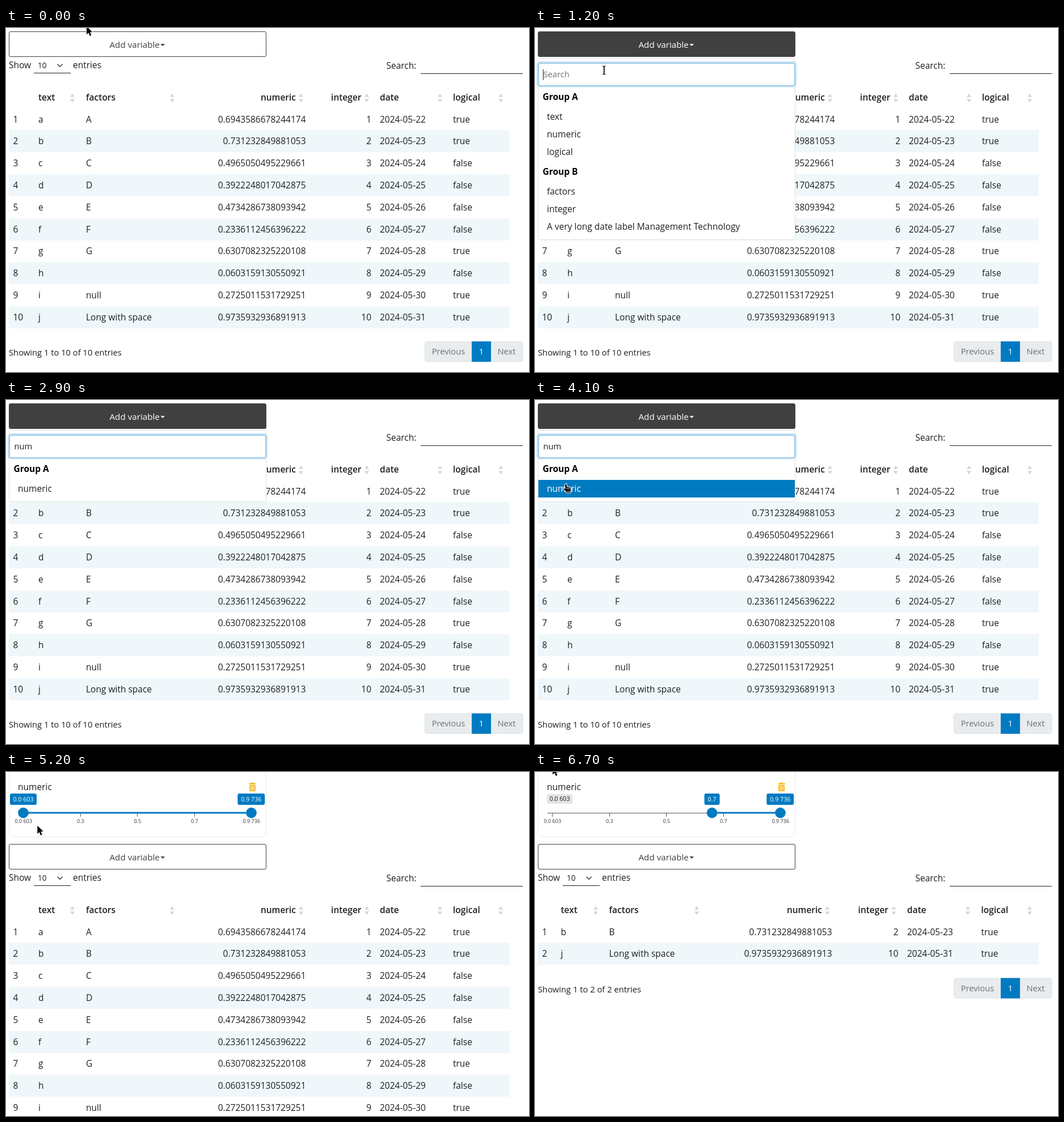
Write an HTML page with a canvas that moves like this. It is 922 px wide and 607 px high and loops after 7300 ms.

```html
<!DOCTYPE html>
<html lang="en">
<head>
<meta charset="utf-8">
<title>Variable filter</title>
<style>
html, body { margin: 0; width: 100%; height: 100%; overflow: hidden; background: #fff; }
canvas { display: block; }
</style>
</head>
<body>
<canvas id="stage" width="922" height="607"></canvas>
<script>
const ctx = document.getElementById('stage').getContext('2d');
const LOOP = 7300, STEP = 100;
const INK = '#1d1f21', BLUE = '#007bc2', DARK = '#404040';
const FONT = '"Open Sans", "Noto Sans", sans-serif';

// Times of the hard changes
const AT = { hover: 300, wallOn: 500, open: 700, wallOff: 1000, n: 2100, u: 2300, m: 2700,
  filter: 2900, pick: 4100, added: 4200, leave: 5100, grab: 5500, release: 6200, rows: 6400 };

const NUMBERS = ['0.6943586678244174', '0.731232849881053', '0.4965050495229661',
  '0.3922248017042875', '0.4734286738093942', '0.2336112456396222', '0.6307082325220108',
  '0.0603159130550921', '0.2725011531729251', '0.9735932936891913'];
const FACTORS = [...'ABCDEFG', '', 'null', 'Long with space'];
const TRUTHS = [0, 1, 6, 8, 9];
const ROWS = NUMBERS.map((num, i) =>
  ['abcdefghij'[i], FACTORS[i], num, String(i + 1), '2024-05-' + (22 + i), String(TRUTHS.includes(i))]);

const NAMES = ['text', 'factors', 'numeric', 'integer', 'date', 'logical'];
const WIDE = { cols: [57, 141, 528.5, 644, 659, 788], sort: [117, 293, 520, 636, 765, 872] };
const NARROW = { cols: [45.5, 130.5, 523.5, 640.5, 656, 786.5], sort: [107, 285, 515.5, 632.5, 763, 872] };

// time, x, y, cursor kind from here on
const PATH = [
  [0, 142, -3, 'arrow'], [100, 142, -3, 'arrow'], [300, 160, 8, 'hand'], [600, 184, 11, 'hand'],
  [800, 184, 11, 'hand'], [1100, 140, 53, 'arrow'], [1200, 122, 74, 'beam'], [1500, 95, 91, 'beam'],
  [2100, 95, 91, 'none'], [3600, 95, 91, 'beam'], [3700, 68, 97, 'beam'], [3800, 32, 122, 'arrow'],
  [3900, 53, 148, 'hand'], [4800, 53, 148, 'hand'], [4900, 73, 127, 'hand'], [5100, 68, 108, 'arrow'],
  [5400, 30, 68, 'arrow'], [5600, 30, 87, 'arrow'], [5900, 313.5, 87, 'arrow'],
  [6100, 313.5, 87, 'arrow'], [6700, 31, -10, 'arrow'], [LOOP, 31, -10, 'arrow']
];

function text(s, x, midY, { size = 15.5, color = INK, weight = 400, align = 'left' } = {}) {
  ctx.font = `${weight} ${size}px ${FONT}`;
  ctx.fillStyle = color;
  ctx.textAlign = align;
  ctx.fillText(s, x, midY + size * 0.355);
}

function rect(x, y, w, h, color) {
  ctx.fillStyle = color;
  ctx.fillRect(x, y, w, h);
}

function box(x, y, w, h, r, fill, stroke, width = 1) {
  ctx.beginPath();
  ctx.roundRect(x, y, w, h, r);
  if (fill) { ctx.fillStyle = fill; ctx.fill(); }
  if (stroke) { ctx.strokeStyle = stroke; ctx.lineWidth = width; ctx.stroke(); }
}

function poly(points, fill, stroke, width = 1) {
  ctx.beginPath();
  points.forEach(([x, y]) => ctx.lineTo(x, y));
  if (fill) { ctx.closePath(); ctx.fillStyle = fill; }
  if (stroke) { ctx.strokeStyle = stroke; ctx.lineWidth = width; ctx.stroke(); }
  if (fill) ctx.fill();
}

function sortMark(x, y) {
  for (const s of [-1, 1]) {
    const base = y + s * 1.8;
    poly([[x - 4, base], [x + 4, base], [x, base + s * 6]], '#d6d6d7');
  }
}

function drawButton(y, dark) {
  box(5.5, y + 0.5, 453, 44, 2.5, dark ? DARK : '#fff', DARK);
  const color = dark ? '#fff' : DARK;
  text('Add variable', 182.5, y + 23.5, { size: 15.2, color });
  poly([[272.5, y + 22], [280, y + 22], [276.2, y + 26]], color);
}

function drawTable(dy, filtered) {
  const { cols, sort } = filtered ? NARROW : WIDE;
  const rows = filtered ? [ROWS[1], ROWS[9]] : ROWS;
  ctx.save();
  ctx.translate(0, dy);

  text('Show', 5, 65.3);
  text('10', 56, 66, { size: 13.6 });
  poly([[90.5, 63.7], [95, 68.2], [99.5, 63.7]], null, '#343a40', 1.6);
  rect(49, 79, 65, 1, INK);
  text('entries', 118, 65.3);
  text('Search:', 670.5, 66);
  rect(731, 80, 180, 1, INK);

  NAMES.forEach((name, c) => {
    const right = c === 2 || c === 3;
    text(name, cols[c] - (right ? 17.5 : 0), 122.2, { weight: 600, align: right ? 'right' : 'left' });
    sortMark(sort[c], 123.5);
  });

  rows.forEach((row, i) => {
    const y = 161 + 38.8 * i;
    if (i % 2) rect(5, Math.round(y - 19.5), 883, 39, '#eff7fb');
    text(String(i + 1), 12.5, y);
    row.forEach((cell, c) => text(cell, cols[c], y, { align: c === 2 || c === 3 ? 'right' : 'left' }));
  });

  const foot = filtered ? 262.5 : 573;
  text(`Showing 1 to ${rows.length} of ${rows.length} entries`, 5, foot, { size: 14.75 });
  const top = foot - 20;
  box(738.5, top + 0.5, 172.5, 35, 3, '#e9ecef', '#dee2e6');
  rect(855, top, 1, 36, '#dee2e6');
  rect(821, top, 34, 36, BLUE);
  const page = { size: 14.75, color: '#6c7075', align: 'center' };
  text('Previous', 780, top + 18, page);
  text('1', 838, top + 18, { ...page, color: '#fff' });
  text('Next', 882.5, top + 18, page);
  ctx.restore();
}

function drawMenu(t) {
  const filtered = t >= AT.filter;
  box(5.5, 53.5, 453, filtered ? 126 : 320, 3, '#fff', '#dfe0e1');
  box(5, 61, 454, 41.5, 4, null, '#bfdef0', 4);
  box(6.5, 62.5, 451, 39, 2.5, '#fff', '#80bde1');

  const typed = t < AT.n ? '' : t < AT.u ? 'n' : t < AT.m ? 'nu' : 'num';
  text(typed || 'Search', 14.5, 82, { size: 14.75, color: typed ? INK : '#737678' });
  if (!typed) rect(14, 73, 1, 19, INK);

  const group = (s, y) => text(s, 13.5, y, { weight: 700, color: '#000' });
  const item = (s, i, y0, color) => text(s, 21, y0 + 31 * i, { color });
  group('Group A', 121.2);
  if (filtered) {
    const active = t >= AT.pick;
    if (active) rect(6, 141, 452, 31, BLUE);
    item('numeric', 0, 156.2, active ? '#fff' : INK);
    return;
  }
  ['text', 'numeric', 'logical'].forEach((s, i) => item(s, i, 156.2));
  group('Group B', 253);
  ['factors', 'integer', 'A very long date label Management Technology']
    .forEach((s, i) => item(s, i, 288.2));
}

function drawTrash() {
  const gold = '#f9b928';
  rect(428, 20, 13, 2, gold);
  rect(432, 18.5, 5, 2, gold);
  box(429, 23, 11, 11, 1.5, gold);
  for (const x of [431.3, 434, 436.7]) rect(x, 25, 1, 7, '#fff');
}

function tag(s, x, w, fill, color) {
  const grey = color !== '#fff';
  box(x - w / 2, grey ? 39 : 38, w, grey ? 17 : 20, 3, fill);
  text(s, x, grey ? 47.5 : 48, { size: 10.7, color, align: 'center' });
}

function drawSlider(t) {
  const LOW = 0.0603, HIGH = 0.9736;
  const value = t < 5700 ? LOW : t < 5800 ? 0.3 : t < 5900 ? 0.5 : 0.7;
  const moved = value !== LOW;
  const x = 30.5 + 402 * (value - LOW) / (HIGH - LOW);

  box(5.5, -5.5, 453, 120, 8, '#fff', '#e9eaeb');
  text('numeric', 21, 26);
  drawTrash();

  rect(22, 72, 420, 1, '#55575a');
  ['0.0 603', '0.3', '0.5', '0.7', '0.9 736'].forEach((s, i) => {
    const tick = 30.5 + 100.5 * i;
    rect(Math.floor(tick), 72, 1, 7, '#55575a');
    text(s, tick + 0.3, 87, { size: 9, color: '#333', align: 'center' });
  });
  rect(x, 70.5, 432.5 - x, 3, BLUE);

  const held = t >= AT.grab && t < AT.release;
  [[x, held ? '#2f92d2' : BLUE], [432.5, BLUE]].forEach(([cx, color]) => {
    ctx.beginPath();
    ctx.arc(cx, 72, 9.3, 0, 7);
    ctx.fillStyle = color;
    ctx.fill();
  });
  if (moved) tag('0.0 603', 43.5, 45, '#e4e4e4', '#222');
  tag(moved ? value.toFixed(1) : '0.0 603', x, moved ? 27 : 47, BLUE, '#fff');
  tag('0.9 736', 432.3, 48, BLUE, '#fff');
}

// Dark desktop showing through, with a blocky lower edge
function drawWall() {
  ctx.save();
  ctx.beginPath();
  ctx.rect(0, 0, 922, 33);
  ctx.rect(496, 33, 426, 64);
  ctx.clip();
  const shade = ctx.createLinearGradient(0, 0, 922, 90);
  shade.addColorStop(0, '#202020');
  shade.addColorStop(0.2, '#343434');
  shade.addColorStop(0.6, '#3d3d3d');
  shade.addColorStop(1, '#505050');
  rect(0, 0, 922, 98, shade);
  for (let i = 0; i < 40; i++) {
    const x = 150 + i * 24;
    poly([[x, 0], [x - 95, 98]], null, 'rgba(20,20,20,.22)');
  }
  poly([[200, 0], [560, 46], [922, 40]], null, 'rgba(20,20,20,.35)');
  poly([[496, 92], [922, 82]], null, 'rgba(20,20,20,.25)');
  ctx.restore();

  [[499, 13, 95], [528, 17, 95], [574, 62, 96], [636, 15, 92], [713, 15, 95],
    [775, 16, 88], [822, 15, 88], [868, 32, 95], [900, 7, 92], [907, 15, 95]]
    .forEach(([x, w, y]) => rect(x, y, w, 98 - y, '#fff'));
  rect(15, 26, 15, 7, DARK);
  rect(78, 30, 14, 3, DARK);
}

const ARROW = [[0, 0], [0, 14.5], [3.4, 11.4], [5.8, 17], [8.4, 15.8], [6, 10.5], [10.4, 10.2]];
const HAND = [[0, 1], [1.2, 0], [2.6, 1], [3, 5], [9, 6.3], [9.8, 8], [9.3, 15.5], [2.4, 15.5],
  [1, 12.5], [-3, 9.3], [-2.2, 8], [0.6, 9]];

function drawCursor(t) {
  const i = PATH.findLastIndex(key => key[0] <= t);
  const a = PATH[i], b = PATH[i + 1] || a;
  const k = b === a ? 0 : (t - a[0]) / (b[0] - a[0]);
  const kind = a[3];
  if (kind === 'none') return;
  ctx.save();
  ctx.translate(a[1] + (b[1] - a[1]) * k, a[2] + (b[2] - a[2]) * k);
  ctx.lineJoin = 'round';
  if (kind === 'beam') {
    const strokes = [[[-3, -7], [-0.5, -6.5], [-0.5, 7.5], [-3, 8]], [[2.5, -7], [0, -6.5], [0, 7.5], [2.5, 8]]];
    strokes.forEach(s => poly(s, null, '#fff', 3));
    strokes.forEach(s => poly(s, null, '#000', 1.2));
  } else {
    poly(kind === 'hand' ? HAND : ARROW, '#000', '#fff', 2.2);
    if (kind === 'hand') {
      for (const x of [3.2, 5.3, 7.4]) poly([[x, 6.5], [x, 9.5]], null, '#fff', 0.8);
      rect(2.8, 12.8, 6, 0.9, '#fff');
    }
  }
  ctx.restore();
}

function draw(t) {
  rect(0, 0, 922, 607, '#fff');
  const added = t >= AT.added;
  const dy = added ? 121 : 0;
  drawTable(dy, t >= AT.rows);
  drawButton(6 + dy, t >= AT.hover && t < AT.leave);
  if (added) drawSlider(t);
  else if (t >= AT.open) drawMenu(t);
  if (t >= AT.wallOn && t < AT.wallOff) drawWall();
  drawCursor(t);
}

function frame() {
  draw(Math.floor(performance.now() % LOOP / STEP) * STEP);
  requestAnimationFrame(frame);
}
frame();
</script>
</body>
</html>
```
